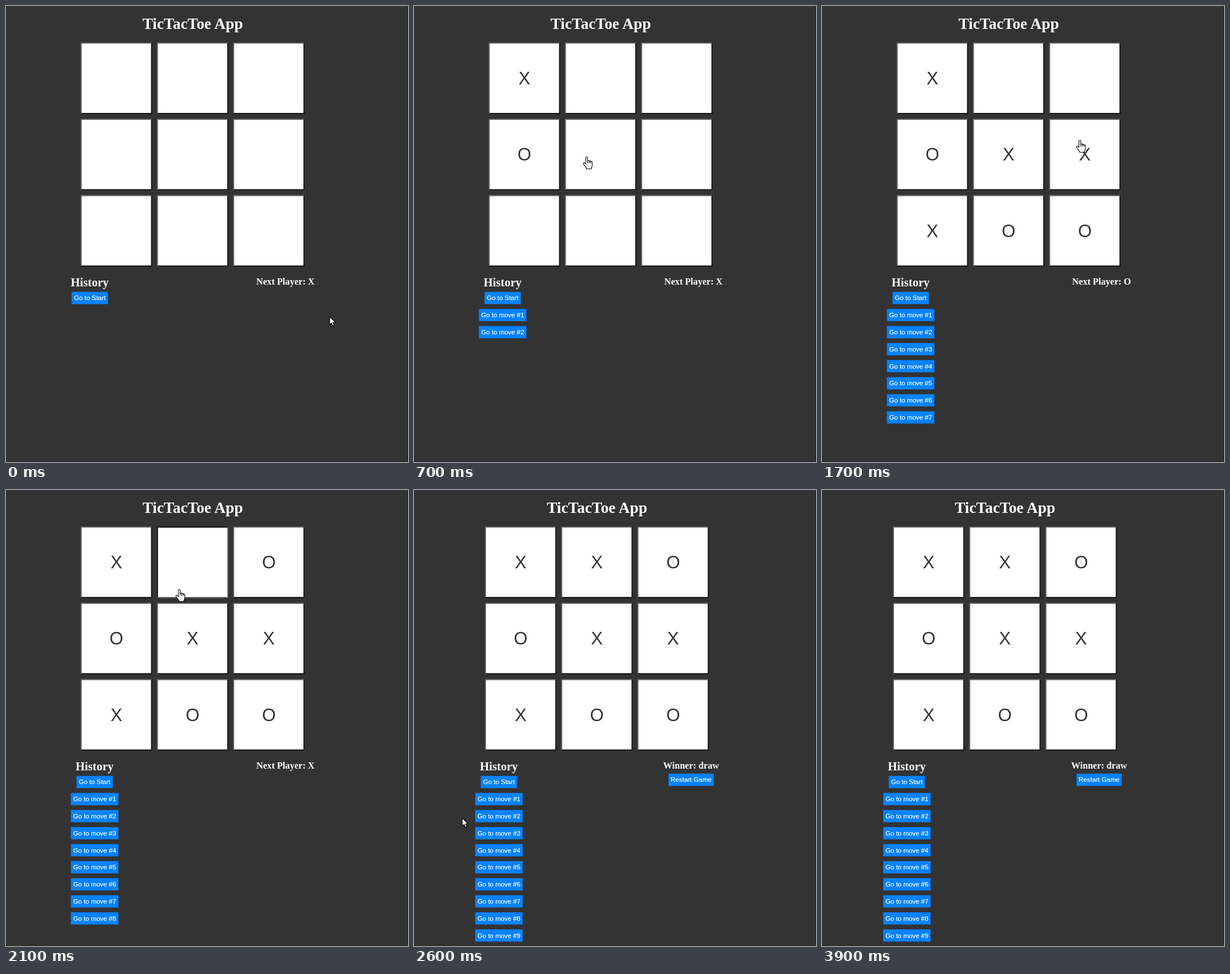
These frames come from a looping animation (703x797 px, 4 s). An HTML page:

```html
<!DOCTYPE html>
<html lang="en">
<head>
<meta charset="utf-8">
<title>TicTacToe App</title>
<style>
  html, body { margin: 0; width: 100%; height: 100%; overflow: hidden; background: #333; }
  svg { display: block; width: 703px; height: 797px; }
  text { text-anchor: middle; fill: #fff; }
  .head { font-family: "Liberation Serif", "Times New Roman", serif; font-weight: bold; }
  .label { font: 11.46px "Liberation Sans", Arial, sans-serif; stroke: #fff; stroke-width: .2; }
  .mark { font: 30.9px "Liberation Sans", Arial, sans-serif; fill: #333; }
  .cursor { fill: #fff; stroke: #000; stroke-width: 1.1; stroke-linejoin: round; stroke-linecap: round; }
</style>
</head>
<body>
<svg id="stage" viewBox="0 0 703 797"></svg>
<script>
const LOOP = 4000, STEP = 100;
const CELL = 124.7, PITCH = 133.3, BORDER = 1.8;
const stage = document.getElementById('stage');

// Moves come at an even pace; X and O alternate.
const order = [0, 3, 4, 7, 6, 8, 5, 2, 1];
const clickTime = i => 300 + 225 * i;

// Where the pointer clicks, in the order of the moves.
const clicks = [[232, 165], [225, 238], [302, 264], [320, 385], [215, 394],
                [430, 385], [451, 235], [445, 150], [303, 174]];
const stops = [
  [0, 566, 543],
  ...clicks.map((p, i) => [clickTime(i), ...p]),
  [2400, 102, 545], [2700, 82, 577], [2900, 69, 503], [3300, 92, 766]
];
const HIDE = 3400;

// Rest, glide, rest between two stops.
function glide(u) {
  const k = Math.min(1, Math.max(0, (u - .35) / .4));
  return k * k * (3 - 2 * k);
}

function pointerAt(t) {
  const i = stops.findIndex(s => s[0] > t);
  if (i < 0) return stops[stops.length - 1].slice(1);
  const [t0, x0, y0] = stops[i - 1], [t1, x1, y1] = stops[i];
  const k = glide((t - t0) / (t1 - t0));
  return [x0 + (x1 - x0) * k, y0 + (y1 - y0) * k];
}

const text = (cls, x, y, s, size) =>
  `<text class="${cls}" x="${x}" y="${y}"${size ? ` font-size="${size}"` : ''}>${s}</text>`;

const button = (cx, y, w, s) =>
  `<rect x="${cx - w / 2}" y="${y}" width="${w}" height="21.4" fill="#0582ff"/>` +
  text('label', cx, y + 14.7, s);

function cell(x, y, mark, pressed) {
  const b = BORDER, inner = CELL - b, light = '#737373', dark = '#111';
  const [tl, br] = pressed ? [dark, light] : [light, dark];
  return `<g transform="translate(${x} ${y})">` +
    `<rect width="${CELL}" height="${CELL}" fill="${br}"/>` +
    `<path fill="${tl}" d="M0 0H${CELL}L${inner} ${b}L${b} ${inner}L0 ${CELL}z"/>` +
    `<rect x="${b}" y="${b}" width="${inner - b}" height="${inner - b}" fill="#fff"/>` +
    (mark ? text('mark', CELL / 2, 73.2, mark) : '') + '</g>';
}

const arrow = '<path d="M0 0V14.2L3.3 11.1L5.5 16.1L7.9 15L5.7 10.2H10.2Z"/>';
const hand =
  '<path d="M-1.6 11.5V1.3Q-1.6 -.3 0 -.3T1.6 1.3V6.5Q3.2 5.4 4.5 7Q6 6.1 7.2 7.7' +
  'Q9.7 7 9.7 9.6V14.5Q9.7 16.5 8.2 18.4V20.8H-.6V18.8Q-2.5 17 -5.6 12.2' +
  'Q-6.2 10.6 -5 10.1Q-3.8 9.6 -1.6 12.2"/>' +
  '<path fill="none" d="M1.6 6.5V10M4.5 7V10.3M7.2 7.7V10.6"/>';

function draw(t) {
  const n = order.filter((c, i) => clickTime(i) < t).length;
  const over = n === order.length;
  const shift = over ? -6.5 : 0; // the scroll bar narrows the page
  const [px, py] = pointerAt(t);
  let hover = false;

  let out = '<rect width="703" height="797" fill="#333"/>' +
    '<rect x="702" width="1" height="797" fill="#1c1c1c"/>' +
    '<rect y="796" width="703" height="1" fill="#222"/>' +
    text('head', 326.5 + shift, 40.3, 'TicTacToe App', 27.3);

  for (let i = 0; i < 9; i++) {
    const x = 130.7 + shift + PITCH * (i % 3);
    const y = 64 + PITCH * Math.floor(i / 3);
    const move = order.indexOf(i);
    const mark = move < n ? 'XO'[move % 2] : '';
    out += cell(x, y, mark, clickTime(move) === t);
    hover ||= px >= x && px < x + CELL && py >= y && py < y + CELL;
  }

  const listX = (n ? 155 : 146.5) + shift;
  out += text('head', listX, 490.3, 'History', 20.6) + button(listX, 499.7, 63.4, 'Go to Start');
  for (let i = 1; i <= n; i++)
    out += button(listX, 499.7 + 29.8 * i, 83, 'Go to move #' + i);

  out += over
    ? text('head', 484.5, 487, 'Winner: draw', 16.1) + button(484.5, 495.7, 79, 'Restart Game')
    : text('head', 488.8, 487, 'Next Player: ' + 'XO'[n % 2], 16.1);

  if (t < HIDE)
    out += `<g class="cursor" transform="translate(${px} ${py})">${hover ? hand : arrow}</g>`;
  stage.innerHTML = out;
}

const start = performance.now();
let last = -1;
function tick() {
  const t = Math.floor((performance.now() - start) % LOOP / STEP) * STEP;
  if (t !== last) draw(last = t);
  requestAnimationFrame(tick);
}
tick();
</script>
</body>
</html>
```
